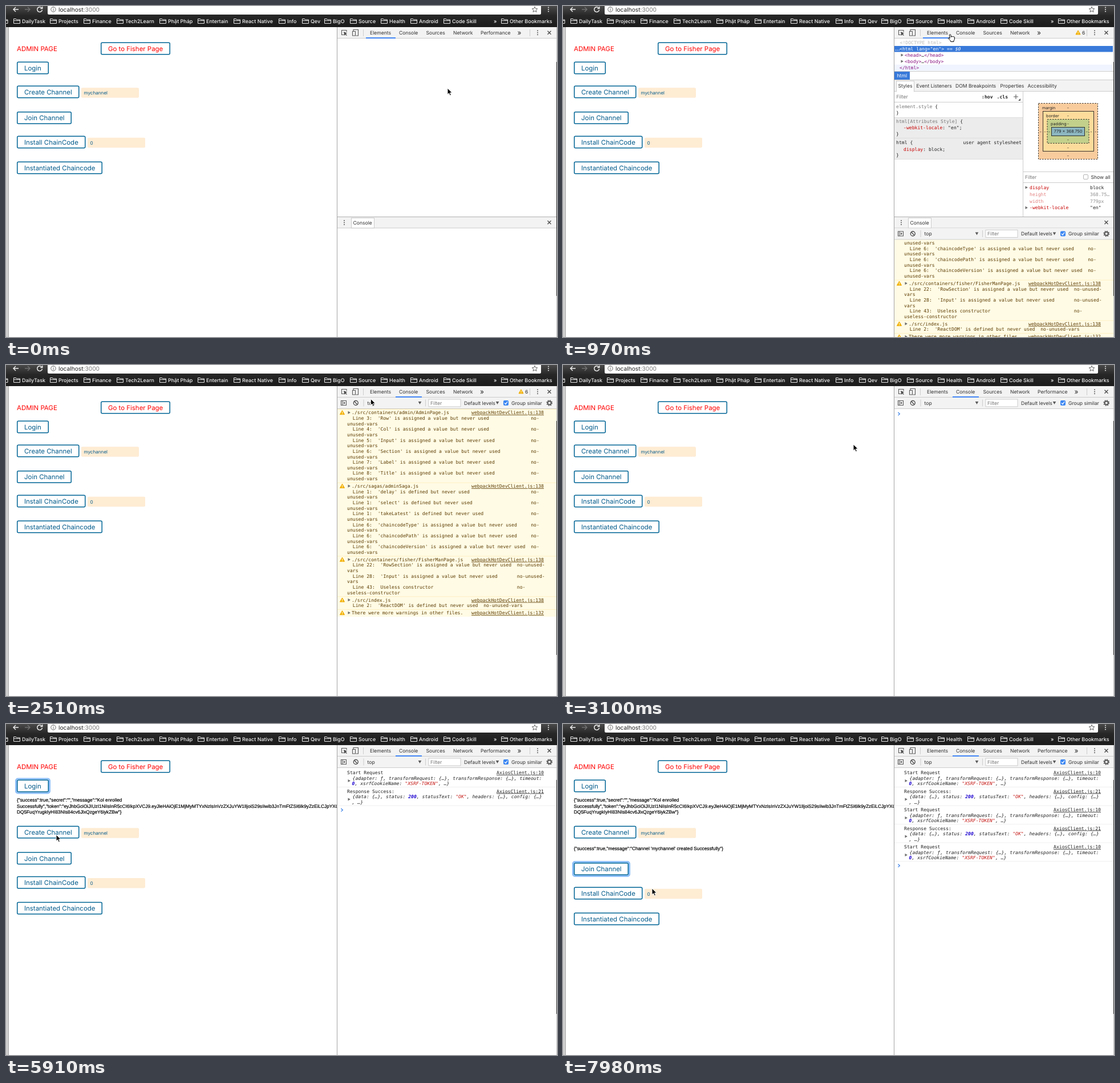
An HTML page for the animation above (8 s loop, 966 by 580 pixels).

```html
<!DOCTYPE html>
<html lang="en">
<head>
<meta charset="utf-8">
<title>Admin page with developer tools</title>
<style>
  html, body { margin: 0; width: 100%; height: 100%; overflow: hidden; background: #fff; }
  svg { display: block; width: 966px; height: 580px; }
  text { white-space: pre; text-rendering: geometricPrecision; font: 8.6px Inter, sans-serif; fill: #303030; }
  .mono { font: 8.12px "DejaVu Sans Mono", monospace; fill: #222; }
  .it { font-style: italic; }
  .bold { font-weight: 700; }
  .page { font-size: 11.45px; fill: #045c8c; }
  .json { font: 8.27px "Liberation Sans", Arial, sans-serif; fill: #000; stroke: #000; stroke-width: .2px; }
  .field { font-size: 8.1px; fill: #045c8c; }
  .mark { font-size: 8.95px; font-weight: 500; fill: #f2f2f2; }
  .url { font-size: 10.2px; fill: #222; }
  .box { font-size: 7.2px; fill: #222; }
  .more { font-size: 12px; }
  .tip { font-size: 8.2px; fill: #fff; }
  .pink { fill: #ee78e6; }
  .red { fill: #f00; }
  .white { fill: #fff; }
  .gray { fill: #777; }
  .pale { fill: #bbb; }
  .tag { fill: #881280; }
  .prop { fill: #c80000; }
  .str { fill: #c41a16; }
  .num { fill: #1c00cf; font-weight: 700; }
  .warn { fill: #5c3c00; }
  .link { text-decoration: underline; text-anchor: end; }
  .end { text-anchor: end; }
  .mid { text-anchor: middle; }
</style>
</head>
<body>
<svg id="stage" viewBox="0 0 966 580"></svg>
<script>
const LOOP = 8000, OPEN = 320, STYLED = 970, CONSOLE = 2210, CLEARED = 2810;
const LOGIN = 4430, LOGGED = 4730, CREATE = 6360, CREATED = 6660, JOIN = 7690;

// Drawing helpers
const text = (x, y, s, cls = '') => `<text x="${x}" y="${y}" class="${cls}">${s}</text>`;
const mono = (x, mid, s, cls = '') => text(x, mid + 3, s, 'mono ' + cls);
const span = (cls, s) => `<tspan class="${cls}">${s}</tspan>`;
const rect = (x, y, w, h, fill, more = '') =>
  `<rect x="${x}" y="${y}" width="${w}" height="${h}" fill="${fill}" ${more}/>`;
const path = (d, stroke = '#5a5a5a', w = 1.2, fill = 'none') =>
  `<path d="${d}" stroke="${stroke}" stroke-width="${w}" fill="${fill}"/>`;
const hline = (x, y, w, c = '#ccc') => rect(x, y, w, 1, c);
const vline = (x, y, h, c = '#ccc') => rect(x, y, 1, h, c);
const group = (s, id) => `<g id="${id}">${s}</g>`;
const during = (from, to, s) => `<g data-from="${from}" data-to="${to}">${s}</g>`;
const caret = (x, y) => path(`M${x - 2} ${y - 2.6}l4.4 2.6-4.4 2.6z`, 'none', 0, '#6e6e6e');
const down = (x, y) => path(`M${x - 2.8} ${y - 2.4}h5.6l-2.8 5z`, 'none', 0, '#5a5a5a');
const cross = (x, y) => path(`M${x - 3} ${y - 3}l6 6m0-6l-6 6`, '#4a4a4a', 1.3);
const dots = (x, y, c = '#5a5a5a') =>
  [-3.5, 0, 3.5].map(d => `<circle cx="${x}" cy="${y + d}" r="1" fill="${c}"/>`).join('');
const warning = (x, y) =>
  path(`M${x} ${y - 3.6}l4 7h-8z`, '#f0ab00', 1, '#f4b400') + rect(x - .5, y - 1.5, 1, 2.6, '#fff') + rect(x - .5, y + 1.8, 1, 1, '#fff');

// Browser chrome
function chrome() {
  const folder = x => path(`M${x} 30.5v-8h4l1 1.5h6v6.5zM${x} 25.6h11`, '#e8e8e8', 1);
  const marks = { DailyTask: 28, Projects: 92, Finance: 151, Tech2Learn: 209, 'Phật Pháp': 284,
    Entertain: 351, 'React Native': 414, Info: 493, Qev: 534, BigO: 573, Source: 618,
    Health: 672, Android: 724, 'Code Skill': 782, 'Other Bookmarks': 883 };
  return `<linearGradient id="bar" x2="0" y2="1"><stop stop-color="#4a4a4a"/>
    <stop offset=".45" stop-color="#272727"/><stop offset="1" stop-color="#1b1b1b"/></linearGradient>`
    + rect(0, 0, 966, 37, 'url(#bar)')
    + rect(73, -6, 865, 21, '#fff', 'rx="2.5"')
    + path('M22 6h-9m4-4l-4 4 4 4', '#f0f0f0', 1.4)
    + path('M33 6h9m-4-4l4 4-4 4', '#707070', 1.4)
    + path('M62.5 3.2a4.4 4.4 0 1 0 1 3.6M63.7 1v3.4h-3.4', '#f0f0f0', 1.5)
    + '<circle cx="83" cy="6" r="4.2" fill="none" stroke="#666"/>' + rect(82.5, 5.2, 1, 3.4, '#666') + rect(82.5, 3.3, 1, 1.1, '#666')
    + text(92, 9.8, 'localhost' + span('gray', ':3000'), 'url')
    + path('M927 1.4l1.4 3.1 3.4.3-2.6 2.3.8 3.4-3-1.8-3 1.8.8-3.4-2.6-2.3 3.4-.3z', '#666', 1)
    + dots(951, 6, '#eee') + folder(-8)
    + Object.entries(marks).map(([s, x]) => folder(x - 14.5) + text(x, 30, s, 'mark')).join('')
    + text(855, 29.5, '»', 'mark');
}

// Web page
const button = (x, y, w, s, cls = '') =>
  rect(x + .75, y + .75, w - 1.5, 20.5, '#fff', 'rx="2" stroke="#006595" stroke-width="1.5"')
  + text(x + 13, y + 15.4, s, 'page ' + cls);
const ring = (y, w) => rect(17.5, y - 1.5, w + 3, 25, 'none', 'rx="3.5" stroke="#8fc0f8" stroke-width="3"');
const field = (x, y, s) => rect(x, y, 101, 17.5, '#feecd3', 'rx="2"') + text(x + 4.5, y + 12, s, 'field');

function page() {
  const reply = ['{"success":true,"secret":"","message":"Kol enrolled',
    'Successfully","token":"eyJhbGciOiJIUzI1NiIsInR5cCI6IkpXVCJ9.eyJleHAiOjE1MjMyMTYxNzIsInVzZXJuYW1lIjoiS29sIiwib3JnTmFtZSI6Ik9yZzEiLCJpYXQ',
    'DQ5FuqYrugkIyHI83NIs84cv6JlxQzgeY6iykZBw"}'];
  return rect(0, 37, 966, 543, '#fff') + rect(0, 37, 4, 543, '#cfcfcf') + vline(4, 37, 543, '#a8a8a8')
    + text(19, 79, 'ADMIN PAGE', 'page red')
    + button(166, 63.5, 122, 'Go to Fisher Page', 'red')
    + during(LOGIN, CREATE, ring(97.5, 56)) + button(19, 97.5, 56, 'Login')
    + during(LOGGED, LOOP, reply.map((s, i) => text(19, 136 + i * 10.5, s, 'json')).join(''))
    + group(during(CREATE, JOIN, ring(139.5, 109.5)) + button(19, 139.5, 109.5, 'Create Channel')
      + field(132, 143.3, 'mychannel'), 'create')
    + during(CREATED, LOOP, text(19, 221, `{"success":true,"message":"Channel 'mychannel' created Successfully"}`, 'json'))
    + group(during(JOIN, LOOP, ring(185, 96)) + button(19, 185, 96, 'Join Channel')
      + button(19, 227.5, 120.5, 'Install ChainCode') + field(143, 230.7, '0')
      + button(19, 272.5, 150, 'Instantiated Chaincode'), 'rest')
    + during(OPEN, 650, rect(4, 37, 576, 272, '#6fa8dc', 'opacity=".66"')
      + path('M11 316.5l6-6.5 6 6.5z', 'none', 0, '#333740') + rect(5, 316, 94.5, 18, '#333740', 'rx="2"')
      + mono(11, 324.5, 'html', 'bold pink') + vline(36.5, 320, 9, '#777')
      + text(42, 327.6, '779 × 368.75', 'tip'));
}

// Developer tools
function tabs() {
  const wide = text(832, 49.6, 'Performance') + text(896.5, 50.5, '»', 'more');
  return rect(581, 37, 384, 19, '#f3f3f3') + hline(581, 56, 384)
    + during(1280, CONSOLE, rect(683, 37, 46, 19, '#dcdcdc'))
    + path('M595 50.5h-6.5v-8h8.5v3', '#5a5a5a', 1.1) + path('M592 45l6.3 2.8-2.6.8 2.2 2.6-1 .8-2.2-2.5-1.3 2.3z', 'none', 0, '#4a4a4a')
    + path('M609 44v-2.5h8.5v10.5h-4', '#5a5a5a', 1.1) + path('M607.5 44.5h5v7.5h-5z', '#5a5a5a', 1.1)
    + vline(626, 41, 12)
    + [['Elements', 638], ['Console', 689], ['Sources', 736.5], ['Network', 784]].map(([s, x]) => text(x, 49.6, s)).join('')
    + during(0, OPEN, wide) + during(CLEARED, LOOP, wide)
    + during(OPEN, CLEARED, text(831, 50.5, '»', 'more') + warning(903, 46.5) + text(910, 49.6, '6'))
    + vline(918, 41, 12) + dots(932, 46.8) + cross(952.5, 46.8)
    + during(0, CONSOLE, rect(631, 55, 52, 2, '#4285f4'))
    + during(CONSOLE, LOOP, rect(683, 55, 46, 2, '#4285f4'));
}

function tree() {
  return mono(590.5, 63.5, '&lt;!DOCTYPE html&gt;', 'pale')
    + rect(581, 70, 383, 10.5, '#3879d9') + text(582, 77.5, '...', 'white bold')
    + mono(590, 75, '&lt;html lang="en"&gt;', 'white') + mono(673, 75, '== $0', 'white it')
    + ['head', 'body'].map((s, i) => caret(594.5, 86 + i * 11)
      + mono(599, 86 + i * 11, `&lt;${s}&gt;${span('mono', '…')}&lt;/${s}&gt;`, 'tag')).join('')
    + rect(581, 102.7, 383, 10.8, '#f0f4fe') + mono(590, 108, '&lt;/html&gt;', 'tag')
    + hline(581, 114, 384) + rect(581, 115, 27, 14, '#3879d9') + text(585.5, 125, 'html', 'white')
    + hline(581, 129, 384) + rect(581, 130, 384, 19, '#f3f3f3') + hline(581, 149, 384)
    + rect(584.5, 131.5, 31, 18.5, '#fff', 'stroke="#ccc"') + rect(585, 148, 30, 3, '#fff')
    + [['Styles', 587.5], ['Event Listeners', 619.5], ['DOM Breakpoints', 688], ['Properties', 766.5], ['Accessibility', 814.5]]
      .map(([s, x]) => text(x, 142.7, s)).join('')
    + vline(806, 150, 219) + text(584.5, 162, 'Filter', 'gray') + hline(581, 168, 225)
    + mono(734, 159, ':hov', 'bold') + mono(760.5, 159, '.cls', 'bold')
    + path('M790 159h8m-4-4v8', '#5a5a5a', 1.1) + path('M802 162v4h-4z', 'none', 0, '#5a5a5a')
    + hline(807, 290, 158) + text(810, 303, 'Filter', 'gray') + text(925.5, 303, 'Show all')
    + rect(912.5, 295.5, 8, 8, '#fff', 'stroke="#b5b5b5" rx="1.5"') + hline(807, 309, 158)
    + during(OPEN, STYLED, rect(807, 330, 158, 16, '#f7f7f7') + hline(807, 330, 158) + hline(807, 346, 158)
      + text(810, 341.5, 'Rendered Fonts'));
}

function styles() {
  const layer = (x, y, w, h, fill, dash) =>
    rect(x + .5, y + .5, w, h, fill, `stroke="#222" stroke-width=".9" ${dash ? 'stroke-dasharray="2.5 2"' : ''}`);
  const computed = [['display', 'block', 1], ['height', '368.75…'], ['width', '779px'], ['-webkit-locale', '"en"', 1]];
  return mono(584, 175.5, span('gray', 'element.style') + ' {') + mono(584, 186.5, '}')
    + rect(581, 195, 225, 74, '#ececec') + hline(581, 195, 225, '#ddd') + hline(581, 231, 225, '#ddd') + hline(581, 268, 225, '#ddd')
    + mono(584, 202, span('gray', 'html[Attributes Style]') + ' {')
    + mono(597, 213, span('prop', '-webkit-locale') + ': "en";') + mono(584, 223.5, '}')
    + mono(584, 239, 'html {') + mono(804, 239, 'user agent stylesheet', 'end')
    + mono(597, 250.5, span('prop', 'display') + ': block;') + mono(584, 261, '}')
    + layer(833, 170, 104, 98, '#f9cc9d', 1) + layer(841, 184, 89, 70, '#fddc9b')
    + layer(848.5, 198, 73, 42, '#c3d08b', 1) + layer(856, 212, 58, 15, '#8cb6c0')
    + text(840, 180.5, 'margin', 'box') + text(847, 194.5, 'border', 'box') + text(855, 208.5, 'padding', 'box')
    + [180.5, 194.5, 208.5, 236.5, 250.5, 264.5].map(y => text(885.5, y, '-', 'box mid')).join('')
    + [837.5, 845, 852.5, 918.5, 926, 934].map(x => text(x, 222.5, '-', 'box mid')).join('')
    + text(885.5, 222.3, '779 × 368.750', 'box mid')
    + computed.map(([key, value, own], i) => {
      const y = 318 + i * 11.8;
      return own ? caret(812.5, y) + mono(818, y, key, 'prop') + mono(924, y, value)
        : `<g opacity=".5">${mono(818, y, key, 'prop') + mono(924, y, value)}</g>`;
    }).join('');
}

const consoleBar = y => rect(581, y - 9.5, 384, 19, '#f3f3f3') + hline(581, y + 9.5, 384)
  + path(`M587.5 ${y - 4}h9v8h-9zM590 ${y - 4}v8`, '#5a5a5a', 1.1) + path(`M592 ${y - 2.2}l3 2.2-3 2.2z`, 'none', 0, '#5a5a5a')
  + `<circle cx="613.3" cy="${y}" r="4" fill="none" stroke="#4a4a4a" stroke-width="1.3"/>` + path(`M610.6 ${y - 2.7}l5.4 5.4`, '#4a4a4a', 1.3)
  + vline(626.5, y - 6, 12) + text(633.5, y + 3, 'top') + down(725.5, y) + vline(735, y - 6, 12)
  + rect(741, y - 6.5, 56, 13, '#fff', 'stroke="#ccc"') + text(744, y + 3.4, 'Filter', 'gray')
  + text(803, y + 3, 'Default levels') + down(861.5, y)
  + rect(872, y - 4.5, 9, 9, '#3b86f2', 'rx="2"') + path(`M874 ${y}l2 2.2 3.2-4.6`, '#fff', 1.2)
  + text(886, y + 3, 'Group similar')
  + `<circle cx="952.7" cy="${y}" r="3.1" fill="none" stroke="#5a5a5a" stroke-width="2"/>
     <circle cx="952.7" cy="${y}" r="4.6" fill="none" stroke="#5a5a5a" stroke-width="1.6" stroke-dasharray="1.8 1.81"/>`;

// Build warnings; the third entry starts at `anchor`
let anchor = 0;
function warnings() {
  const pitch = 9.65, assigned = 'is assigned a value but never used', defined = 'is defined but never used';
  const unused = (line, name, verb) => [`  Line ${line}:  '${name}' ${verb}`.padEnd(66) + 'no-', 'unused-vars'];
  const entries = [
    ['./src/containers/admin/AdminPage.js', 138, ['Row', 'Col', 'Input', 'Section', 'Label', 'Title'].flatMap((s, i) => unused(i + 3, s, assigned))],
    ['./src/sagas/adminSaga.js', 138, [...['delay', 'select', 'takeLatest'].flatMap(s => unused(1, s, defined)),
      ...['Type', 'Path', 'Version'].flatMap(s => unused(6, 'chaincode' + s, assigned))]],
    ['./src/containers/fisher/FisherManPage.js', 138, [
      `  Line 22:  'RowSection' ${assigned}  no-unused-`, 'vars',
      `  Line 28:  'Input' ${assigned}       no-unused-`, 'vars',
      '  Line 43:  Useless constructor'.padEnd(61) + 'no-', 'useless-constructor']],
    ['./src/index.js', 138, [`  Line 2:  'ReactDOM' ${defined}  no-unused-vars`]],
    ['There were more warnings in other files.', 132, []]];
  let y = 0, out = '';
  entries.forEach(([title, line, rows], i) => {
    if (i === 2) anchor = y;
    const height = (rows.length + 1) * pitch + 3.3, mid = y + 6.3;
    out += rect(581, y, 384, height, '#fffbe5') + hline(581, y, 384, '#fff0c0')
      + warning(589.5, mid) + caret(601.5, mid) + mono(606, mid, title, 'warn')
      + mono(943, mid, `webpackHotDevClient.js:${line}`, 'warn link')
      + rows.map((s, k) => mono(598, mid + (k + 1) * pitch, s, 'warn')).join('');
    y += height;
  });
  return out;
}

const logTimes = [LOGIN, LOGGED, CREATE, CREATED, JOIN];
function logEntry(i) {
  const y = 85 + i * 32.5, response = i % 2;
  const [title, link, first, second] = response
    ? ['Response Success:', 21, `{data: {…}, status: ${span('num', '200')}, statusText: ${span('str', '"OK"')}, headers: {…}, config: {…}`, ', …}']
    : ['Start Request', 10, '{adapter: ƒ, transformRequest: {…}, transformResponse: {…}, timeout:',
      `${span('num', '0')}, xsrfCookieName: ${span('str', '"XSRF-TOKEN"')}, …}`];
  return mono(598, y, title) + mono(943, y, `AxiosClient.js:${link}`, 'link')
    + caret(601.5, y + 14.5) + mono(607.5, y + 9.6, first, 'it') + mono(606.5, y + 19.2, second, 'it')
    + hline(581, y + 25, 384, '#f0f0f0');
}

function devtools() {
  const list = warnings();
  return rect(580, 37, 386, 543, '#fff') + vline(580, 37, 543, '#a3a3a3') + tabs()
    + during(OPEN, CONSOLE, tree()) + during(STYLED, CONSOLE, styles())
    + during(0, CONSOLE, hline(581, 369, 384, '#b0b0b0') + rect(581, 370, 384, 19, '#f3f3f3') + hline(581, 388.5, 384)
      + dots(593, 379.5) + rect(605.5, 371.5, 40, 17.5, '#fff', 'stroke="#ccc"') + text(608.5, 382.6, 'Console') + cross(952.5, 379.3))
    + during(OPEN, CONSOLE, `<clipPath id="drawer">${rect(581, 409, 384, 171, '#000')}</clipPath>
      <g clip-path="url(#drawer)">${group(list, 'drawerLog')}</g>` + consoleBar(399)
      + during(OPEN, STYLED, rect(958, 510, 5, 76, '#909090', 'rx="2.5"')))
    + during(CONSOLE, LOOP, consoleBar(66.5))
    + during(CONSOLE, CLEARED, `<g transform="translate(0 77)">${list}</g>`)
    + logTimes.map((t, i) => during(t, LOOP, logEntry(i))).join('')
    + during(CLEARED, LOOP, group(path('M587.5 83l2.8 2.7-2.8 2.7', '#3b82e8', 1.3), 'prompt'))
    + vline(965, 37, 543, '#c4c4c4') + vline(965, 98, 410, '#2a2a2a');
}

const cursor = group(
  path('M0 0v11.2l2.6-2.4 1.8 4.2 2-.9-1.8-4.1h3.6z', '#fff', 1, '#000'), 'arrow')
  + group(path('M0 1q1.2-1.6 2.4 0l.6 4 .6-1 1.6.4.5-.5 1.5.6.5-.3 1.4 1-.1 3.8-1.4 2.5v1.6h-5.2l-.6-1.8-3.8-4q.2-1.6 1.8-.6l1 .8z', '#000', 1, '#fff'), 'hand');

// Pointer runs: start, end, steps, target x, target y
const runs = [[0, 0, 1, 774, 144], [150, 500, 3, 676.5, 56], [650, 650, 1, 675, 50], [970, 1910, 7, 692, 46],
  [2360, 2660, 3, 613, 66], [2960, 3100, 2, 509, 139], [3250, 3250, 1, 433, 192], [3550, 4140, 5, 63, 111],
  [4730, 4730, 1, 144, 122], [4880, 5770, 7, 102, 186], [5910, 5910, 1, 88, 194],
  [6800, 7390, 5, 98, 251], [7840, 7980, 2, 156, 288]];
const stops = [];
let [px, py] = [774, 144];
for (const [start, end, n, x, y] of runs) {
  for (let i = 1; i <= n; i++) {
    const at = n > 1 ? start + (end - start) * (i - 1) / (n - 1) : start;
    stops.push({ at: Math.floor(at), x: px + (x - px) * i / n, y: py + (y - py) * i / n });
  }
  [px, py] = [x, y];
}

const stage = document.getElementById('stage');
stage.innerHTML = page() + devtools() + chrome() + cursor;
const timed = [...stage.querySelectorAll('[data-from]')];
const byId = id => document.getElementById(id);
const move = (id, x, y) => byId(id).setAttribute('transform', `translate(${x} ${y})`);
const show = (el, on) => { el.style.display = on ? '' : 'none'; };

function draw() {
  const t = performance.now() % LOOP;
  timed.forEach(el => show(el, t >= +el.dataset.from && t < +el.dataset.to));
  move('create', 0, t < LOGGED ? 0 : 39);
  move('rest', 0, t < LOGGED ? 0 : t < CREATED ? 39.3 : 58);
  move('drawerLog', 0, 479.7 - anchor + (t < STYLED ? 2.4 : 0));
  move('prompt', 0, 32.5 * logTimes.filter(at => t >= at).length);
  const { x, y } = stops.findLast(s => s.at <= t);
  const hand = t >= 500 && t < 2500;
  show(byId('hand'), hand);
  show(byId('arrow'), !hand);
  move(hand ? 'hand' : 'arrow', x, y);
  requestAnimationFrame(draw);
}
draw();
</script>
</body>
</html>
```
